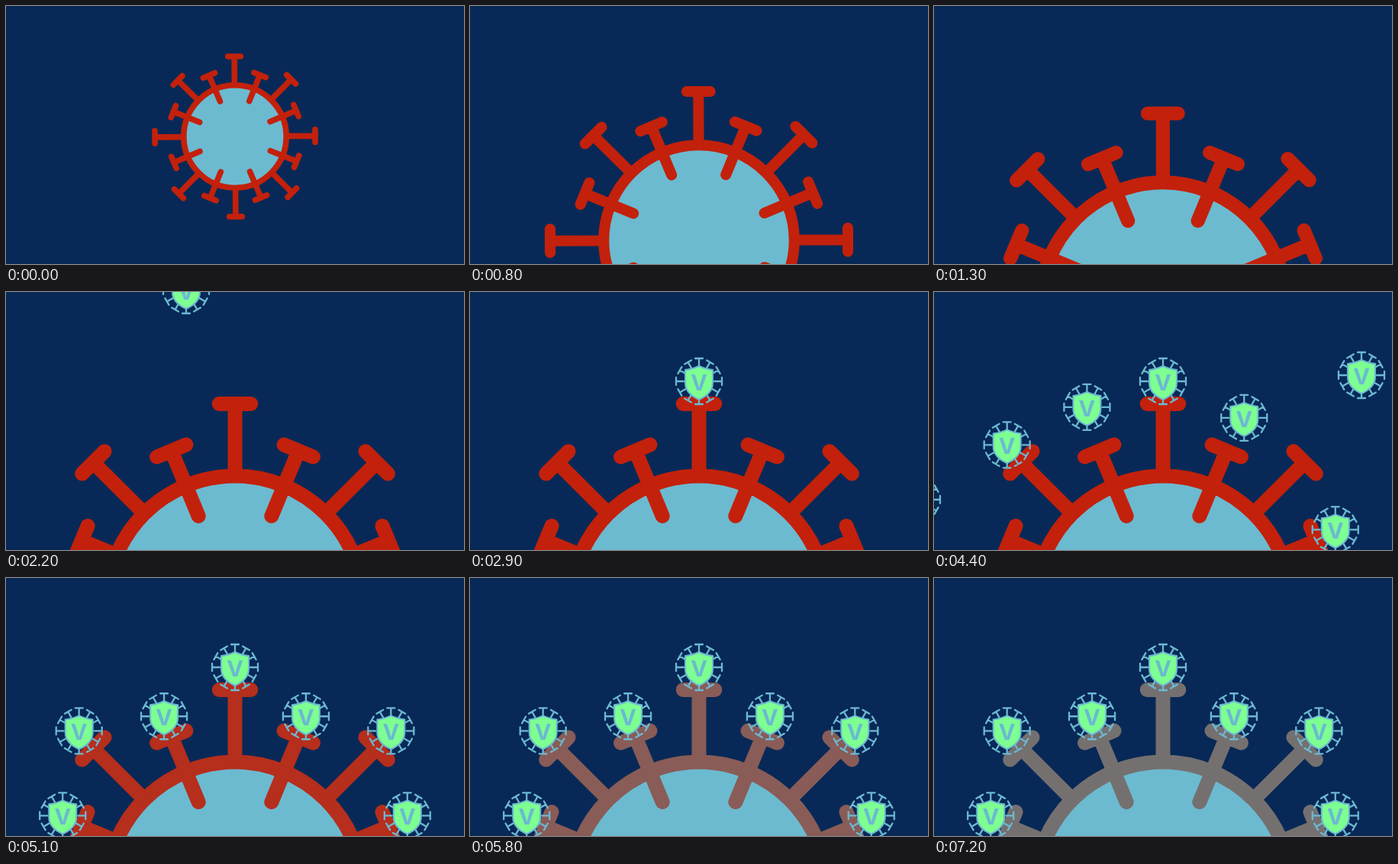
Recreate the animation shown at these times as an HTML page. Size 600 px wide and 338 px high, loop 7.3 s.

```html
<!DOCTYPE html>
<html lang="en">
<head>
<meta charset="utf-8">
<title>Antibodies neutralise a virus</title>
<style>
  html, body { margin: 0; width: 100%; height: 100%; overflow: hidden; background: #082957; }
  svg { display: block; width: 100vw; height: 100vh; }
  text { font: bold 29px Inter, sans-serif; text-anchor: middle; }
</style>
</head>
<body>
<svg id="stage" viewBox="0 0 600 338">
  <defs>
    <g id="antibody">
      <path id="thorns" fill="none" stroke="#6cb9d2" stroke-width="2.3" stroke-linecap="round"/>
      <path d="M-18-15Q-8-16 0-20Q8-16 18-15V2C18 13 9 20 0 24C-9 20-18 13-18 2Z"
        fill="#7dff91" stroke="#6cb9d2" stroke-width="2" stroke-linejoin="round"/>
      <text y="12" fill="#6cb9d2">V</text>
    </g>
  </defs>
  <rect width="600" height="338" fill="#082957"/>
  <g id="virus" stroke-width="7.6" stroke-linecap="round">
    <circle r="67.2" fill="#6cbad0"/>
    <path id="spikes" fill="none"/>
  </g>
</svg>
<script>
const LOOP = 7300, STEP = 100;
const ZOOM_END = 1400, FADE_START = 4900, FADE_END = 6100;
const RED = [195, 33, 11], GREY = [117, 112, 112];
const CX = 300, START_Y = 171, END_Y = 409;

// Each antibody flies straight through (x, y) at time t and lands on a spike.
// Spikes are counted from the top one, negative to the left.
const flights = [
  { spike: 0, t: 2200, x: 236, y: -2, land: 2850 },
  { spike: -2, t: 3600, x: 38, y: 106, land: 4160 },
  { spike: -1, t: 3600, x: 165, y: -11, land: 4550 },
  { spike: 1, t: 3600, x: 503, y: 46, land: 4510 },
  { spike: 2, t: 4400, x: 560, y: 109, land: 4920 },
  { spike: -3, t: 4400, x: -22, y: 272, land: 4950 },
  { spike: 3, t: 3600, x: 556, y: 278, land: 3830 }
];

const $ = id => document.getElementById(id);
const mix = (a, b, p) => a + (b - a) * p;
const ramp = (t, from, to) => Math.max(0, Math.min(1, (t - from) / (to - from)));

// A T-shaped spike pointing outwards at the given angle.
function spike(deg, inner, outer, half) {
  const a = deg * Math.PI / 180, c = Math.cos(a), s = Math.sin(a);
  const at = (r, w) => (r * c - w * s).toFixed(2) + " " + (r * s + w * c).toFixed(2);
  return `M${at(inner, 0)}L${at(outer, 0)}M${at(outer, -half)}L${at(outer, half)}`;
}

const ring = (count, draw) => Array.from({ length: count }, (_, i) => draw(i)).join("");

$("spikes").setAttribute("d", ring(16, i =>
  i % 2 ? spike(i * 22.5, 50, 87, 8.3) : spike(i * 22.5, 68, 105, 8.3)));
$("thorns").setAttribute("d", ring(12, i => spike(i * 30, 20, i % 3 ? 29 : 30, 5)));

for (const f of flights) {
  const a = f.spike * 22.2 * Math.PI / 180, r = f.spike % 2 ? 246 : 292;
  f.endX = CX + r * Math.sin(a);
  f.endY = END_Y - r * Math.cos(a);
  f.icon = document.createElementNS("http://www.w3.org/2000/svg", "use");
  f.icon.setAttribute("href", "#antibody");
  $("stage").append(f.icon);
}

function draw(t) {
  const zoom = ramp(t, 0, ZOOM_END), fade = ramp(t, FADE_START, FADE_END);
  const color = RED.map((v, i) => Math.round(mix(v, GREY[i], fade)));
  $("virus").setAttribute("transform",
    `translate(${CX} ${mix(START_Y, END_Y, zoom)}) scale(${mix(1, 2.5, zoom)}) rotate(${mix(-0.5, 0, zoom)})`);
  $("virus").setAttribute("stroke", `rgb(${color})`);
  for (const f of flights) {
    const p = Math.min(1, (t - f.t) / (f.land - f.t));
    f.icon.setAttribute("transform", `translate(${mix(f.x, f.endX, p)} ${mix(f.y, f.endY, p)})`);
  }
}

let start;
function tick(now) {
  start ??= now;
  draw(Math.floor((now - start) % LOOP / STEP) * STEP);
  requestAnimationFrame(tick);
}
draw(0);
requestAnimationFrame(tick);
</script>
</body>
</html>
```
